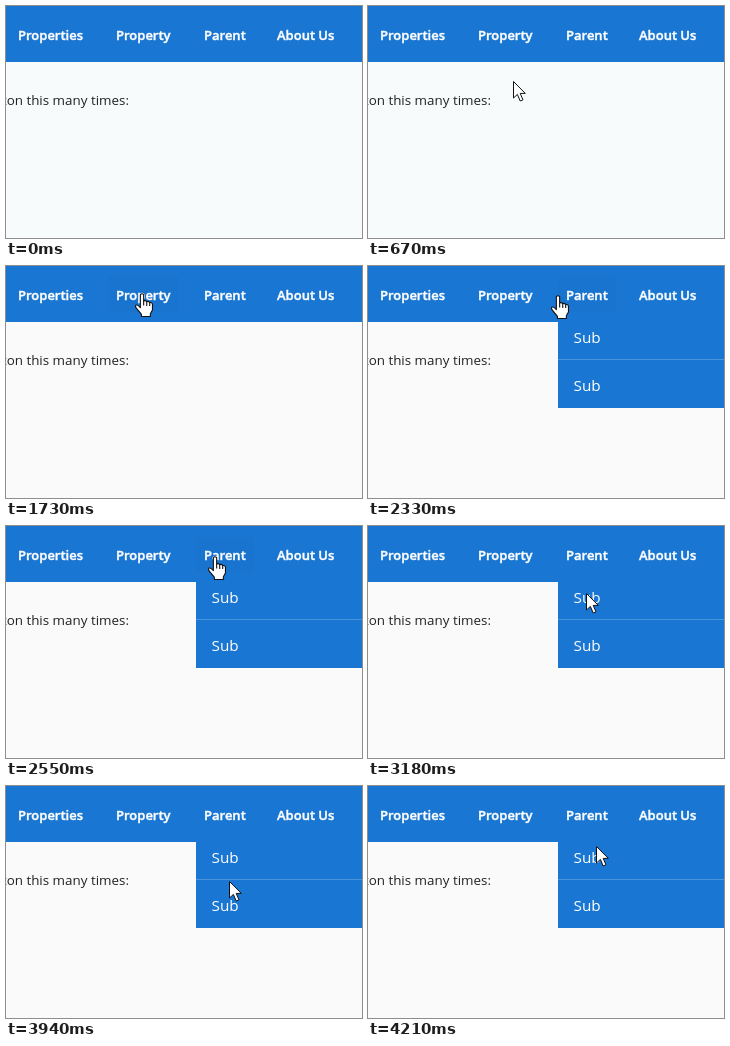
An HTML page with a canvas for the animation above (4.24 s loop, 356x232 px).

```html
<!DOCTYPE html>
<html lang="en">
<head>
<meta charset="utf-8">
<title>Navigation menu</title>
<style>
  html, body { margin: 0; width: 100%; height: 100%; overflow: hidden; background: #fafafa; }
  canvas { display: block; }
</style>
</head>
<body>
<canvas id="stage" width="356" height="232"></canvas>
<script>
const ctx = document.getElementById('stage').getContext('2d');
const LOOP = 4240;
const ENTER = 30, WARM = 1700, OPEN = 2320;
const BLUE = '#1976d2', WHITE = '#fff';
const FONT = '"Open Sans", "Noto Sans", sans-serif';
const NAV_FONT = '600 13px ' + FONT;

const items = [
  { label: 'Properties', x: 12 },
  { label: 'Property', x: 110 },
  { label: 'Parent', x: 198 },
  { label: 'About Us', x: 271 }
];
ctx.font = NAV_FONT;
for (const item of items) item.width = ctx.measureText(item.label).width;

// Each stroke carries the pointer from the last resting place to a new one.
const entry = { x: 180, y: 198 };
const strokes = [
  { from: ENTER, until: 550, x: 265, y: 124, bend: { x: -150, y: -105 } },
  { from: 550, until: 970, x: 22, y: 24 },
  { from: 1210, until: 1520, x: 136, y: 28 },
  { from: 2120, until: 2550, x: 209, y: 31 },
  { from: 2970, until: 3270, x: 219, y: 71 },
  { from: 3450, until: 3760, x: 222, y: 103 },
  { from: 3910, until: 4210, x: 228, y: 60 }
];

const arrow = new Path2D('M.5 .5V17L4.4 13.4L7.2 20L10 18.8L7.2 12.4H12.3Z');
const hand = new Path2D('M5.5 1.6Q7 0 8.5 1.6V7.4Q10.2 6.4 11.3 8Q13 7.2 14 8.8Q16 8.3 16.5 10.2' +
  'V15.5L14.6 19V21.5H6.5V19.5L2 14Q.4 12 1.6 11.1Q3 10.4 5.5 13.4Z');
const fingers = new Path2D('M8.5 7.4V11.5M11.3 8V11.8M14 8.8V12');

const easeOut = u => 1 - (1 - u) ** 2;
const mix = (a, b, u) => a + (b - a) * u;
const mixPoint = (a, b, u) => ({ x: mix(a.x, b.x, u), y: mix(a.y, b.y, u) });

function pointer(t) {
  let spot = entry;
  for (const stroke of strokes) {
    if (t < stroke.from) break;
    const u = easeOut(Math.min(1, (t - stroke.from) / (stroke.until - stroke.from)));
    const { bend } = stroke;
    spot = bend
      ? mixPoint(mixPoint(spot, bend, u), mixPoint(bend, stroke, u), u)
      : mixPoint(spot, stroke, u);
  }
  return spot;
}

function rect(color, x, y, w, h) {
  ctx.fillStyle = color;
  ctx.fillRect(x, y, w, h);
}

function text(label, x, y, font, color, weight = 0) {
  ctx.font = font;
  ctx.fillStyle = ctx.strokeStyle = color;
  ctx.fillText(label, x, y);
  if (weight) {
    ctx.lineWidth = weight;
    ctx.strokeText(label, x, y);
  }
}

function drawPointer({ x, y }, isHand) {
  const shape = isHand ? hand : arrow;
  ctx.save();
  ctx.translate(Math.round(x), Math.round(y));
  if (isHand) {
    ctx.scale(1.1, 1.1);
    ctx.translate(-7, -1);
  }
  ctx.fillStyle = WHITE;
  ctx.strokeStyle = '#111';
  ctx.lineWidth = 1;
  ctx.lineJoin = 'round';
  ctx.fill(shape);
  ctx.stroke(shape);
  if (isHand) ctx.stroke(fingers);
  ctx.restore();
}

function draw(t) {
  rect(t < WARM ? '#f8fbfc' : '#fafafa', 0, 0, 356, 232);
  rect(BLUE, 0, 0, 356, 56);

  const tip = pointer(t);
  const hovered = t >= ENTER && tip.y >= 10 && tip.y < 47 &&
    items.find(({ x, width }) => tip.x >= x - 9 && tip.x <= x + width + 9);
  if (hovered) rect('#1974cf', hovered.x - 8, 11, hovered.width + 16, 35);

  for (const { label, x } of items) text(label, x, 34, NAV_FONT, WHITE, 0.4);
  ctx.textAlign = 'right';
  text('ton this many times:', 123, 99, '13.4px ' + FONT, '#222');
  ctx.textAlign = 'left';

  if (t >= OPEN) {
    rect(BLUE, 190, 56, 166, 86);
    rect('#4b94dc', 190, 93, 166, 1);
    for (const y of [77, 125]) text('Sub', 205.5, y, '15.3px ' + FONT, WHITE);
  }
  if (t >= ENTER) drawPointer(tip, Boolean(hovered));
}

const start = performance.now();
function tick() {
  draw((performance.now() - start) % LOOP);
  requestAnimationFrame(tick);
}
tick();
</script>
</body>
</html>
```
